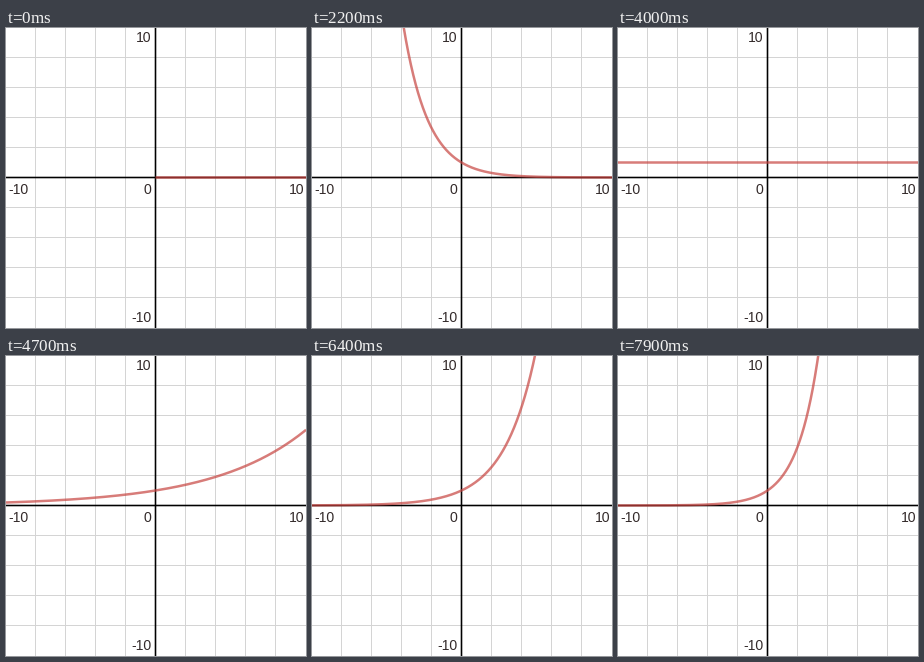
A matplotlib script that plays this animation: 300x300 px, repeating every 8 s.

```python
import matplotlib.pyplot as plt
import numpy as np
from matplotlib.animation import FuncAnimation

SIZE, DPI = 300, 100
PX = 72 / DPI            # points per pixel
ORIGIN, UNIT = 149.5, 15  # graph origin and pixels per unit
FRAMES, INTERVAL = 80, 100
BASE_STEP = 0.025

fig = plt.figure(figsize=(SIZE / DPI, SIZE / DPI), dpi=DPI, facecolor="white")
ax = fig.add_axes([0, 0, 1, 1])
ax.set(xlim=(0, SIZE), ylim=(SIZE, 0))
ax.axis("off")


def cross(pos, color, width):
    """Draw a vertical and a horizontal rule through the same offset."""
    style = dict(color=color, lw=width * PX, snap=False)
    ax.plot([pos, pos], [-5, SIZE + 5], **style)
    ax.plot([-5, SIZE + 5], [pos, pos], **style)


def label(x, y, text, align="right"):
    ax.text(x, y, text, ha=align, va="baseline", color="#332a2a",
            family="Liberation Sans", size=14 * PX)


for k in range(-4, 5):
    if k:
        cross(ORIGIN + 2 * UNIT * k, "#d4d4d4", 1)
cross(ORIGIN, "black", 1.6)

label(145.5, 14, "10")
label(145.5, 294, "-10")
label(145.5, 166, "0")
label(2.8, 166, "-10", "left")
label(298, 166, "10")

xs = np.linspace(-10.4, 10.4, 4000)
curve, = ax.plot([], [], color="#c74440", alpha=0.7, lw=2.5 * PX,
                 snap=False, solid_joinstyle="round", solid_capstyle="butt")


def update(i):
    """Plot y = a^x with the base a growing steadily from zero."""
    with np.errstate(all="ignore"):
        ys = np.power(BASE_STEP * i, xs)
    ys = np.where(ys < 12, ys, np.nan)
    curve.set_data(ORIGIN + UNIT * xs, ORIGIN - UNIT * ys)
    return curve,


anim = FuncAnimation(fig, update, frames=FRAMES, interval=INTERVAL,
                     repeat=True, repeat_delay=0, blit=False)
plt.show()
```
